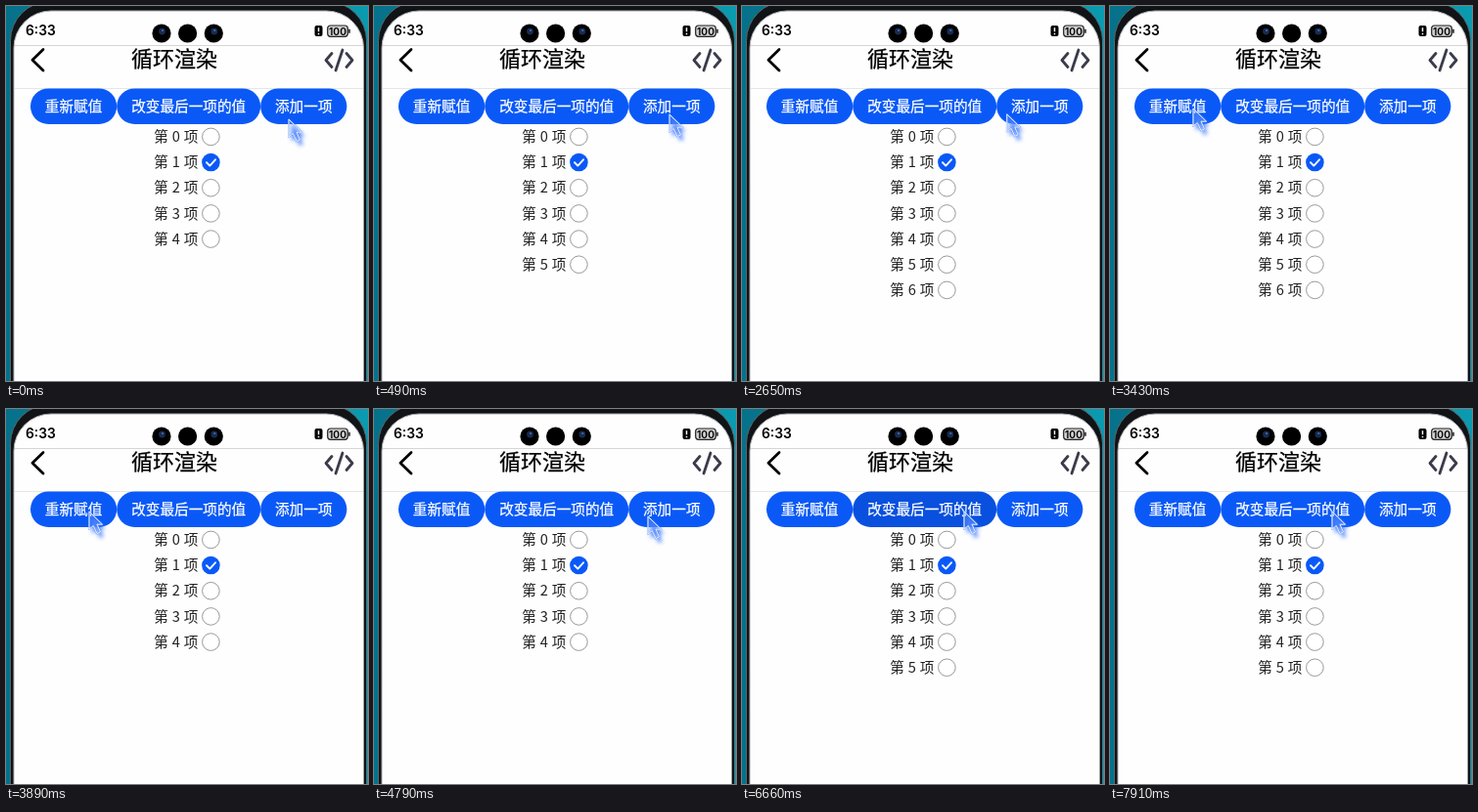
These frames come from a looping animation (370x384 px, 8000 ms). An HTML page:

```html
<!DOCTYPE html>
<html lang="zh-CN">
<head>
<meta charset="utf-8">
<style>
  html, body { margin: 0; width: 100%; height: 100%; overflow: hidden; }
  svg { display: block; width: 100%; height: 100%; font-family: "Noto Sans CJK SC", "Noto Sans CJK", sans-serif; }
  .button text { fill: #fff; stroke: #fff; stroke-width: .25; font-size: 14.65px; text-anchor: middle; }
  .row text { fill: #222; font-size: 14.65px; word-spacing: .6px; }
  .status { font-family: Inter, sans-serif; font-weight: 600; }
  .icon { fill: none; stroke-width: 2.8; stroke-linecap: round; stroke-linejoin: round; }
</style>
</head>
<body>
<svg viewBox="0 0 370 384">
  <defs>
    <linearGradient id="wall">
      <stop offset="0" stop-color="#06718a"/>
      <stop offset="1" stop-color="#0a9bb0"/>
    </linearGradient>
    <filter id="glow" x="-100%" y="-100%" width="300%" height="300%">
      <feGaussianBlur stdDeviation="2.2"/>
    </filter>
    <path id="arrow" d="M0 0V18L4.3 14.5L8 22.5L11.5 21L8 13.2H13.5Z"/>
    <g id="camera">
      <circle r="9.6"/>
      <circle cx=".5" cy="-2" r="3.4" fill="#172c50"/>
      <circle cx="1" cy="-3" r="1" fill="#4a72b8"/>
    </g>
  </defs>

  <rect width="370" height="384" fill="url(#wall)"/>
  <rect x="4.5" y="-4.5" width="364" height="450" rx="40" fill="#111417" stroke="#5d6467"/>
  <rect x="8" y="5" width="357.5" height="440" rx="38" fill="#fefefe" stroke="#a9adb0"/>
  <path d="M9 40.5H365" stroke="#d5d5d5"/>
  <path d="M9 84.5H365" stroke="#e6e6e6"/>

  <text class="status" x="20" y="30" font-size="13.8">6:33</text>
  <use href="#camera" x="159" y="28"/>
  <circle cx="185.6" cy="28" r="9.6"/>
  <use href="#camera" x="212.3" y="28"/>
  <rect x="315.5" y="20" width="8" height="11" rx="2"/>
  <path d="M319.5 22.2v4m0 1.6v1.4" stroke="#fff" stroke-width="1.5"/>
  <rect x="328.7" y="20" width="20.6" height="11.3" rx="3" fill="#cfcfcf" stroke="#222" stroke-width="1.2"/>
  <path d="M351 23.7v4" stroke="#222" stroke-width="1.6"/>
  <text class="status" x="339" y="29.6" font-size="10.3" text-anchor="middle">100</text>

  <path class="icon" stroke="#000" d="M38 44.5L27 55.2L38 66"/>
  <text x="128" y="62.3" font-size="22" stroke="#000" stroke-width=".25">循环渲染</text>
  <path class="icon" stroke="#3b3b4b" d="M333 48.5L327 55.5L333 62.5M348 48.5L354 55.5L348 62.5M344 45L337 66"/>

  <g id="buttons"></g>
  <g id="rows"></g>
  <g id="cursor">
    <use href="#arrow" transform="translate(3 4.5)" filter="url(#glow)" fill="#2f6fff" fill-opacity=".85"/>
    <use href="#arrow" fill="#a9c5ff" fill-opacity=".25" stroke="#5c8df5" stroke-opacity=".6" stroke-width="1.8" stroke-linejoin="round"/>
    <use href="#arrow" fill="none" stroke="#e6efff" stroke-linejoin="round"/>
  </g>
</svg>
<script>
const LOOP = 8000, STEP = 70, START_ITEMS = 5, MAX_ITEMS = 7;
const BLUE = '#0a59f7', PRESSED = '#0950de';
const RESET = 0, CHANGE = 1, ADD = 2;
const byId = id => document.getElementById(id);

let left = 25;
byId('buttons').innerHTML = ['重新赋值', '改变最后一项的值', '添加一项'].map(label => {
  const x = left, width = label.length * 14.68 + 29.5;
  left += width;
  return `
  <g class="button">
    <rect x="${x}" y="84.4" width="${width}" height="36.6" rx="18.3"/>
    <text x="${x + width / 2}" y="108">${label}</text>
  </g>`;
}).join('');

const emptyBox = '<circle cx="209.4" r="8.8" fill="#fff" stroke="#999"/>';
const checkedBox = `<circle cx="209.4" r="9.3" fill="${BLUE}"/>
  <path d="M205 .2L208.3 3.5L214 -2.8" class="icon" style="stroke:#fff;stroke-width:1.9"/>`;
byId('rows').innerHTML = Array.from({ length: MAX_ITEMS }, (_, i) => `
  <g class="row" transform="translate(0 ${133.9 + i * 26.17})">
    <text x="151.2" y="5.2">第 ${i} 项</text>${i === 1 ? checkedBox : emptyBox}
  </g>`).join('');

const buttons = document.querySelectorAll('.button rect');
const rows = document.querySelectorAll('.row');

const home = { x: 289, y: 116 };
const moves = [
  { from: 60, to: 150, x: 302, y: 111 },
  { from: 1910, to: 2500, x: 289, y: 111 },
  { from: 2650, to: 3000, x: 110, y: 109 },
  { from: 3250, to: 3430, x: 85, y: 105 },
  { from: 4450, to: 4790, x: 280, y: 110 },
  { from: 5690, to: 5930, x: 234, y: 106 },
  { from: 6080, to: 6290, x: 227, y: 105 }
];
const clicks = [
  { button: ADD, down: 420, up: 490 },
  { button: ADD, down: 1550, up: 1610 },
  { button: RESET, down: 3680, up: 3890 },
  { button: ADD, down: 5240, up: 5360 },
  { button: CHANGE, down: 6660, up: 6780 },
  { button: CHANGE, down: 7360, up: 7450 },
  { button: CHANGE, down: 7820, up: 7910 }
];

const ease = u => .3 * u + .7 * u * u * (3 - 2 * u);

// The pointer advances in discrete steps, the first one at the start of a move.
function progress({ from, to }, t) {
  if (t < from) return 0;
  const intervals = Math.round((to - from) / STEP);
  const done = Math.floor((t - from) / (to - from) * intervals) + 1;
  return ease(Math.min(1, done / (intervals + 1)));
}

function pointerAt(t) {
  return moves.reduce(({ x, y }, move) => {
    const p = progress(move, t);
    return { x: x + (move.x - x) * p, y: y + (move.y - y) * p };
  }, home);
}

function itemsAt(t) {
  return clicks.filter(({ up }) => up <= t).reduce((count, { button }) =>
    button === RESET ? START_ITEMS : button === ADD ? count + 1 : count, START_ITEMS);
}

const isPressed = (index, t) =>
  clicks.some(({ button, down, up }) => button === index && t >= down && t < up);

function draw(t) {
  const { x, y } = pointerAt(t);
  const count = itemsAt(t);
  byId('cursor').setAttribute('transform', `translate(${x} ${y})`);
  buttons.forEach((rect, i) => rect.setAttribute('fill', isPressed(i, t) ? PRESSED : BLUE));
  rows.forEach((row, i) => row.setAttribute('visibility', i < count ? 'visible' : 'hidden'));
}

const start = performance.now();
function tick() {
  draw((performance.now() - start) % LOOP);
  requestAnimationFrame(tick);
}
tick();
</script>
</body>
</html>
```
